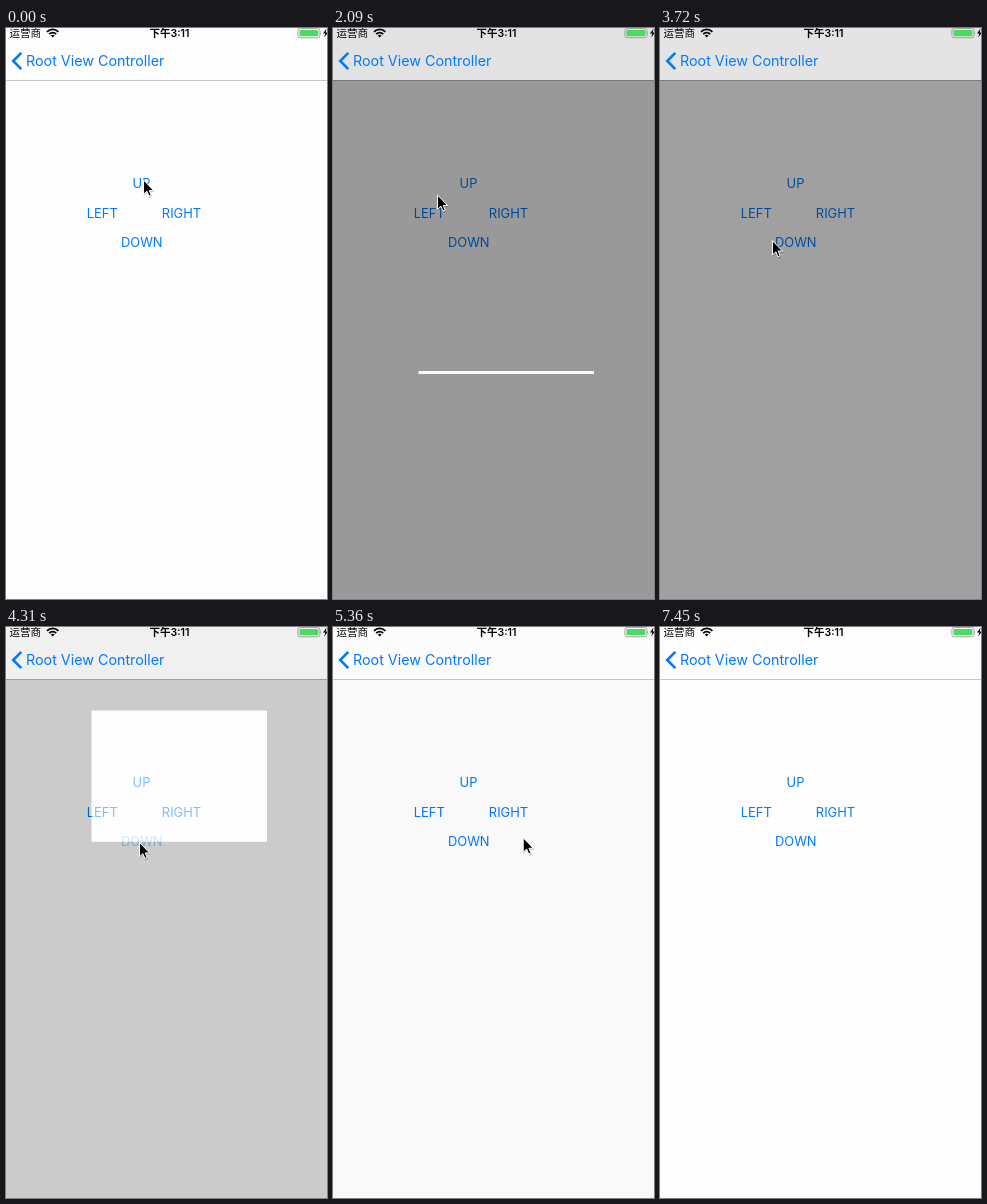
Write an HTML page that moves like this. It is 321 by 571 pixels and loops after 7.74 s.

```html
<!DOCTYPE html>
<html lang="zh">
<head>
<meta charset="utf-8">
<style>
  html, body { margin: 0; width: 100%; height: 100%; overflow: hidden; background: #fefefe; }
  svg { display: block; width: 321px; height: 571px; }
  text { font-family: Inter, "Noto Sans CJK SC", "Noto Sans CJK", sans-serif; }
  .button { font-size: 12.9px; fill: #007aff; text-anchor: middle; }
  .title { font-size: 14.3px; fill: #007aff; }
  .status { font-size: 10.5px; }
</style>
</head>
<body>
<svg viewBox="0 0 321 571">
  <rect width="321" height="571" fill="#fefefe"/>
  <text class="button" id="up" x="135.5" y="159.5">UP</text>
  <text class="button" id="left" x="96.3" y="190">LEFT</text>
  <text class="button" id="right" x="175.5" y="190">RIGHT</text>
  <text class="button" id="down" x="135.8" y="219">DOWN</text>

  <g id="popup">
    <rect width="321" height="571" fill="#000" opacity=".4"/>
    <rect id="panel" fill="#fff"/>
  </g>

  <rect width="321" height="52" fill="#fefefe" opacity=".73"/>
  <rect y="52" width="321" height="1" opacity=".22"/>
  <path d="M15.3 24.8L7.2 33L15.3 41.2" fill="none" stroke="#007aff" stroke-width="2.6"/>
  <text class="title" x="20" y="38">Root View Controller</text>

  <text class="status" x="3.5" y="9">运营商</text>
  <g fill="none" stroke="#000" stroke-width="1.8">
    <path d="M41 3.8A8 8 0 0 1 52.4 3.8"/>
    <path d="M43.2 6.2A5 5 0 0 1 50.2 6.2"/>
  </g>
  <path d="M44.8 7.5Q46.7 6 48.6 7.5L46.7 9.6Z"/>
  <text class="status" x="163.5" y="9" text-anchor="middle" font-weight="600">下午3:11</text>
  <rect x="291.9" y=".4" width="22" height="9.4" rx="2.3" fill="none" stroke="#999" stroke-width=".9"/>
  <rect x="293.4" y="1.9" width="19" height="6.4" rx="1.2" fill="#4cd964"/>
  <path d="M314.2 3.4Q316 5 314.2 6.8Z" fill="#999"/>
  <path d="M320.6 .5L317 5.6H319.3L318.2 9.6L322 4.5H319.7Z"/>

  <g id="cursor">
    <path d="M.5 1.5V16.5L4.2 13.5L6.4 18.5L9.2 17.3L7.1 12.6H11.8Z" opacity=".2"/>
    <path d="M.5 .5V14.8L3.9 11.7L6 16.6L8.2 15.6L6.2 10.9H10.6Z" stroke="#fff"/>
  </g>
</svg>
<script>
const LOOP = 7740, SPAN = 200, GONE = 7310, FRAME = 150;
const BOX = { x: 85.5, y: 83.5, w: 175.5, h: 262.5 };
const $ = id => document.getElementById(id);

// The pointer presses at "home", dismisses at "away", and bends by "via" to the next button
const popups = [
  { id: 'up', open: 790, close: 1905, home: [137, 151.5], away: [33, 137], via: [144, 166] },
  { id: 'left', open: 2756, close: 3470, home: [84, 184], away: [46, 198], via: [90, 210] },
  { id: 'down', open: 4210, close: 4992, home: [133, 215], away: [54, 213], via: [237, 258] },
  { id: 'right', open: 6010, close: 6600, home: [174, 184], away: [39.5, 163], via: [180, 360] }
];
const exit = { open: 7100, home: [313, 561] };

const clamp = u => Math.min(1, Math.max(0, u));
const ease = u => (u = clamp(u)) < .5 ? 2 * u * u : 1 - 2 * (1 - u) ** 2;
const easeOut = u => 1 - (1 - clamp(u)) ** 3;
const line = (a, b, s) => a.map((v, i) => v + (b[i] - v) * s);
const curve = (a, b, c, s) => line(line(a, b, s), line(b, c, s), s);

// The screen refreshes in steps, with one shift of phase midway
function snap(t) {
  const start = t < 3580 ? 740 : 3560;
  return start + FRAME * Math.floor((t - start) / FRAME);
}

function pointer(t) {
  const i = Math.max(0, popups.findLastIndex(p => t >= p.open - 100));
  const { close, home, away, via } = popups[i];
  if (t < close) return line(home, away, ease((t - close + 615) / 350));
  const next = popups[i + 1] || exit;
  return curve(away, via, next.home, easeOut((t - close) / (next.open - 100 - close)));
}

function setPanel(id, size) {
  const vertical = id === 'up' || id === 'down';
  const width = vertical ? BOX.w : BOX.w * size;
  const height = vertical ? BOX.h * size : BOX.h;
  const x = id === 'left' ? BOX.x + BOX.w - width : BOX.x;
  const y = id === 'up' ? BOX.y + BOX.h - height : BOX.y;
  set('panel', { x, y, width, height });
}

function set(id, attrs) {
  for (const key in attrs) $(id).setAttribute(key, attrs[key]);
}

function draw(time) {
  const t = snap(time);
  let opacity = 0;
  for (const { id, open, close } of popups) {
    const pressed = t > open - 100 && t < open + 150;
    set(id, { opacity: pressed ? .35 : 1 });
    if (t < open || t > close + 2 * SPAN) continue;
    // Grow and fade in together; shrink first, then fade out
    const grow = ease((t - open) / SPAN);
    setPanel(id, grow * (1 - ease((t - close) / SPAN)));
    opacity = grow * (1 - ease((t - close - SPAN) / SPAN));
  }
  set('popup', { opacity });
  set('cursor', {
    transform: `translate(${pointer(t)})`,
    visibility: time < GONE ? 'visible' : 'hidden'
  });
}

const begin = performance.now();
function tick() {
  draw((performance.now() - begin) % LOOP);
  requestAnimationFrame(tick);
}
tick();
</script>
</body>
</html>
```
